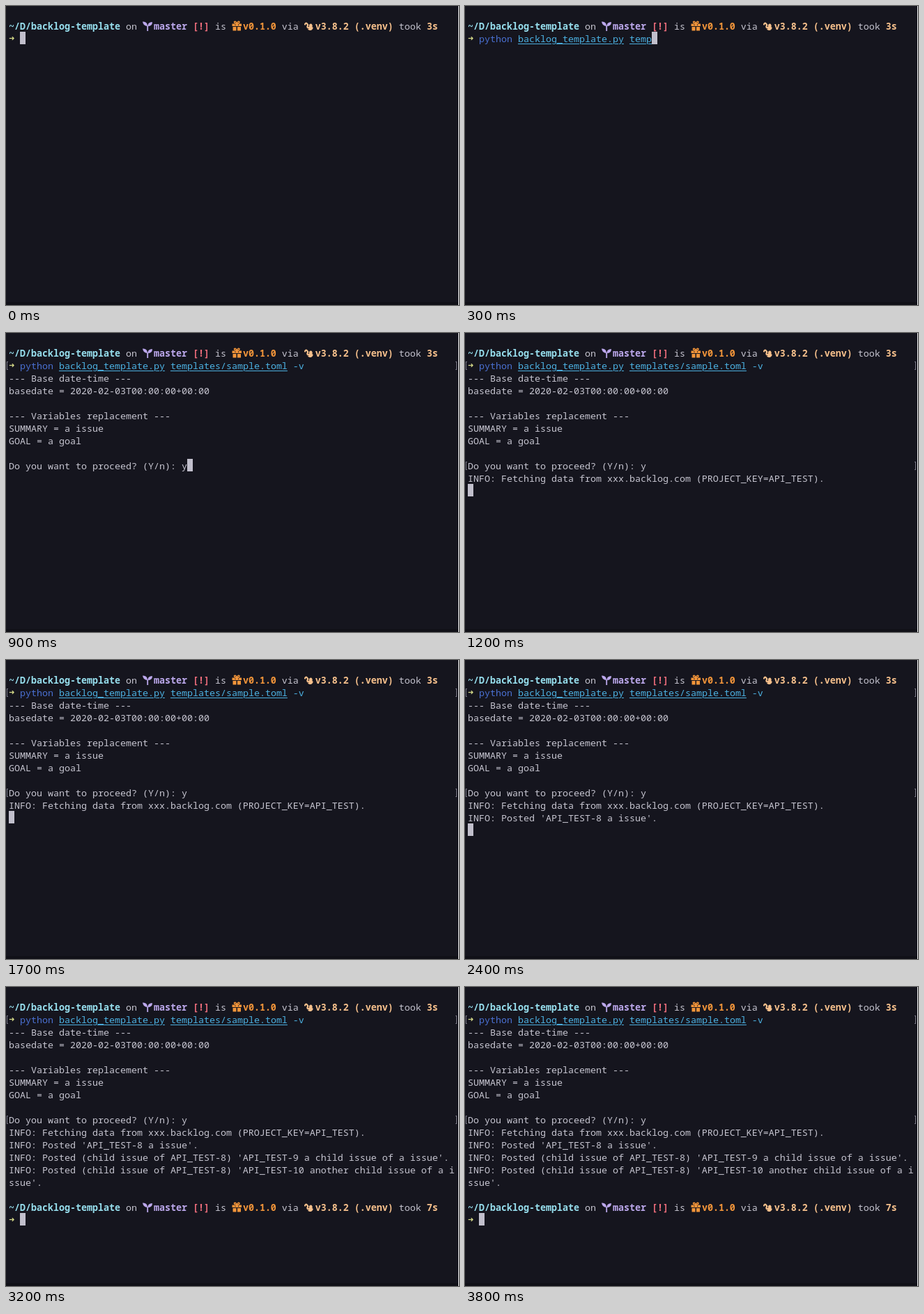
These frames come from a looping animation (650 px wide and 430 px high, 4000 ms). An HTML page:

```html
<!DOCTYPE html>
<html lang="en">
<head>
<meta charset="utf-8">
<title>Terminal session</title>
<style>
  html, body { margin: 0; width: 100%; height: 100%; overflow: hidden; background: #15151e; }
  #term {
    position: relative; width: 650px; height: 430px; overflow: hidden;
    color: #c6c5d0; font: 13.3333px/18px "Noto Sans Mono", monospace;
    font-variant-ligatures: none;
  }
  #term > * { position: absolute; white-space: pre; height: 18px; }
  b { font-weight: 600; }
  u { text-decoration-thickness: 1px; text-underline-offset: 2px; }
  svg { position: absolute; top: -1px; width: 16px; height: 18px; }
  .arrow { color: #dbe08c; font-family: "DejaVu Sans Mono", monospace; font-weight: 700; }
  .dir { color: #97dfee; }
  .git { color: #bca8ec; }
  .dirty { color: #ee6d7c; }
  .pkg { color: #f3953a; }
  .py { color: #f6c08c; }
  .cmd { color: #4a70d2; }
  .arg { color: #4cb1e2; }
  .typed { overflow: hidden; }
  .mark { width: 2px; box-sizing: border-box; border: 1px solid #777683; }
  .mark.left { border-right: 0; }
  .mark.right { border-left: 0; }
  #cursor { width: 8px; background: #c1bfcc; }
  #term > .edge { right: 0; top: 0; width: 1px; height: 430px; background: #f4f4f4; }
  #term > .base { left: 0; bottom: 0; width: 649px; height: 4px; background: #101017; }
</style>
</head>
<body>
<div id="term"><div id="cursor"></div><div class="base"></div><div class="edge"></div></div>
<script>
const LOOP = 4000, CELL = 8, LINE = 18, LEFT = 4, TOP = 19;
const term = document.getElementById('term');
const cursor = document.getElementById('cursor');
const items = [];

function add(start, row, col, html, className = '') {
  const el = document.createElement('div');
  el.className = className;
  el.innerHTML = html;
  el.style.left = LEFT + col * CELL + 'px';
  el.style.top = TOP + 1 + row * LINE + 'px';
  term.append(el);
  items.push({ el, start });
  return el;
}

const icon = (col, className, shapes) =>
  `<svg class="${className}" style="left:${col * CELL}px" viewBox="0 0 16 18" fill="currentColor">${shapes}</svg>`;

const sprout = icon(24, 'git',
  '<path d="M0 3.5Q7 3 7 10Q1 10 0 3.5ZM7.5 10Q7 4.5 14 4Q14 10 7.5 10Z"/>' +
  '<path d="M7.2 9V17" stroke="currentColor" stroke-width="1.8"/>');
const gift = icon(40, 'pkg',
  '<path d="M0.5 6.5H14V10H0.5ZM1.5 11H6.5V16.5H1.5ZM8 11H13V16.5H8Z"/>' +
  '<path d="M7.2 6.5C3 6 2.5 3 5 3.3Q6.5 3.7 7.2 6.5Q8 3.7 9.5 3.3C12 3 11.5 6 7.2 6.5" fill="none" stroke="currentColor" stroke-width="1.4"/>' +
  '<path d="M5 7.5V9M9.5 7.5V9" stroke="#15151e"/>');
const snake = icon(53, 'py',
  '<path d="M1 7.5Q2 4.5 4 6.5T4.5 10Q4 13 6.5 12T8 8.5Q10 6.5 10.5 9T7 14.5Q10 16 11.5 12.5" fill="none" stroke="currentColor" stroke-width="2.2" stroke-linecap="round"/>');

function prompt(start, row, took) {
  add(start, row, 0,
    '<b class="dir">~/D/backlog-template</b> on   <b class="git">master</b> <b class="dirty">[!]</b> is ' +
    '  <b class="pkg">v0.1.0</b> via   <b class="py">v3.8.2 (.venv)</b> ' +
    `took <b class="py">${took}</b>` + sprout + gift + snake);
  add(start, row + 1, 0, '➜', 'arrow');
}

// Brackets the terminal puts around a submitted line
function marks(start, row) {
  for (const [side, x] of [['left', 1], ['right', 645]]) {
    const el = add(start, row, 0, '', 'mark ' + side);
    el.style.left = x + 'px';
    el.style.top = TOP + 4 + row * LINE + 'px';
    el.style.height = '12px';
  }
}

prompt(0, 0, '3s');
const typed = add(100, 1, 2,
  '<span class="cmd">python</span> <span class="arg"><u>backlog_template.py</u> <u>templates/sample.toml</u> -v</span>',
  'typed');
const typedLength = typed.textContent.length;
marks(600, 1);

add(700, 2, 0, '--- Base date-time ---');
add(700, 3, 0, 'basedate = 2020-02-03T00:00:00+00:00');
add(700, 5, 0, '--- Variables replacement ---');
add(700, 6, 0, 'SUMMARY = a issue');
add(700, 7, 0, 'GOAL = a goal');
add(700, 9, 0, 'Do you want to proceed? (Y/n): ');
add(900, 9, 31, 'y');
marks(1000, 9);
add(1100, 10, 0, 'INFO: Fetching data from xxx.backlog.com (PROJECT_KEY=API_TEST).');
add(2200, 11, 0, "INFO: Posted 'API_TEST-8 a issue'.");
add(2500, 12, 0, "INFO: Posted (child issue of API_TEST-8) 'API_TEST-9 a child issue of a issue'.");
add(2700, 13, 0, "INFO: Posted (child issue of API_TEST-8) 'API_TEST-10 another child issue of a i\nssue'.");
prompt(2800, 16, '7s');

// Cursor stops: start time, row, column
const stops = [
  [0, 1, 2], [600, 2, 0], [700, 9, 31], [900, 9, 32], [1000, 10, 0], [1100, 11, 0],
  [2200, 12, 0], [2500, 13, 0], [2700, 15, 0], [2800, 17, 2]
];
const blinks = [[1300, 1600], [1900, 2200], [2900, 3100], [3400, 3700]];

function draw() {
  const t = Math.floor(performance.now() % LOOP / 100) * 100;
  for (const { el, start } of items) el.style.visibility = t >= start ? 'visible' : 'hidden';

  const count = Math.round(typedLength * Math.min(t / 500, 1));
  typed.style.width = count * CELL + 'px';

  const [, row, col] = stops.findLast(([start]) => t >= start);
  cursor.style.left = LEFT + (col + (row === 1 ? count : 0)) * CELL + 'px';
  cursor.style.top = TOP + row * LINE + 'px';
  cursor.style.visibility = blinks.some(([off, on]) => t >= off && t < on) ? 'hidden' : 'visible';
  requestAnimationFrame(draw);
}
draw();
</script>
</body>
</html>
```
